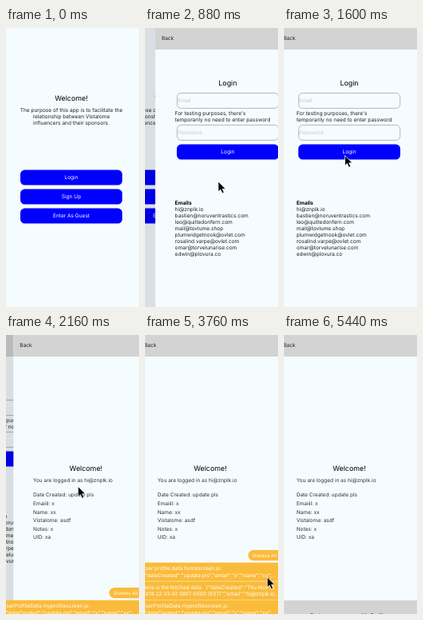
Write an HTML page that moves like this. It is 167x349 px and loops after 6400 ms.

```html
<!DOCTYPE html>
<html lang="en">
<head>
<meta charset="utf-8">
<title>App walkthrough</title>
<style>
  html, body { margin: 0; width: 100%; height: 100%; overflow: hidden; background: #f5fcff; }
  svg { display: block; width: 100%; height: 100%; }
  text { font: 6.55px Inter, "Open Sans", sans-serif; fill: #222; white-space: pre; text-rendering: geometricPrecision; }
  .mid { text-anchor: middle; }
  .title { font-size: 8.9px; fill: #000; }
  .soft { font-size: 6.5px; fill: #333; }
  .bold { font-weight: 700; fill: #000; }
  .hint { fill: #c7c7cd; }
  .white { fill: #fff; }
  .field { fill: none; stroke: #a3a7a9; stroke-width: .8; }
</style>
</head>
<body>
<svg id="stage" viewBox="0 0 167 349" preserveAspectRatio="none"></svg>
<script>
const LOOP = 6400, STEP = 80;
const EDGE = -9, WIDTH = 185;
const PAPER = '#f5fcff', GREY = '#d3d3d3', BLUE = '#0000ff', AMBER = '#fabb3a';
const stage = document.getElementById('stage');

function add(parent, tag, attrs = {}, content = '') {
  const el = document.createElementNS('http://www.w3.org/2000/svg', tag);
  for (const key in attrs) el.setAttribute(key, attrs[key]);
  el.textContent = content;
  return parent.appendChild(el);
}

const rect = (g, x, y, width, height, fill, rx = 0) =>
  add(g, 'rect', { x, y, width, height, fill, rx });
const label = (g, x, y, content, cls = '') =>
  add(g, 'text', { x, y, class: cls }, content);

function lines(g, x, y, gap, list, cls) {
  list.forEach((content, i) => label(g, x, y + i * gap, content, cls));
}

function button(g, y, content) {
  rect(g, 18, y, 128, 19, BLUE, 5.5);
  label(g, 82, y + 11.8, content, 'mid white');
}

function field(g, y, hint) {
  add(g, 'rect', { x: 18.4, y, width: 127.4, height: 19, rx: 5, class: 'field' });
  label(g, 19, y + 12, hint, 'hint');
}

function card(header) {
  const g = add(stage, 'g');
  rect(g, EDGE, 0, WIDTH, 349, PAPER);
  if (header) {
    rect(g, EDGE, 0, WIDTH, 27, GREY);
    label(g, -1, 14.6, 'Back');
  }
  return g;
}

// Each card carries a shade that darkens it while it is pushed back.
const shade = g => add(g, 'rect', { x: EDGE, y: 0, width: WIDTH, height: 349, opacity: 0 });

const home = card(false);
label(home, 82, 91.3, 'Welcome!', 'mid title');
lines(home, 82, 104.6, 8.1, [
  'The purpose of this app is to facilitate the',
  'relationship between Vistalome',
  'influencers and their sponsors.'
], 'mid');
['Login', 'Sign Up', 'Enter As Guest'].forEach((name, i) => button(home, 177.6 + i * 24, name));
const homeShade = shade(home);

const login = card(true);
label(login, 82, 71.5, 'Login', 'mid title');
field(login, 81.4, 'Email');
lines(login, 15.7, 109.2, 8, ["For testing purposes, there's", 'temporarily no need to enter password']);
field(login, 121.4, 'Password');
button(login, 145.6, 'Login');
label(login, 15.7, 220.6, 'Emails', 'bold');
lines(login, 15.7, 228.7, 8.05, [
  'hi@znplk.io',
  'bastien@noruventrastics.com',
  'leo@quiltedonfern.com',
  'mail@tovlume.shop',
  'plumwidgetnook@ovlet.com',
  'rosalind.varpe@ovlet.com',
  'omar@torvelunarise.com',
  'edwin@plovura.co'
]);
const loginShade = shade(login);

const profile = card(true);
label(profile, 82, 170.2, 'Welcome!', 'mid title');
label(profile, 15.7, 183.6, 'You are logged in as hi@znplk.io', 'soft');
lines(profile, 15.7, 202.4, 10.6, [
  'Date Created: update pls', 'Emaiiil: x', 'Name: xx',
  'Vistalome: asdf', 'Notes: x', 'UID: xa'
], 'soft');
rect(profile, EDGE, 332, WIDTH, 17, GREY);
label(profile, 33, 352.5, 'Partners');
label(profile, 97, 352.5, 'My Profile');

// Warnings stack upward from the bottom edge.
const record = '{"dateCreated":"update pls","email":"x","name":"xx",...';
const warnings = [
  ['userProfileData myprofilescreen.js:', record],
  ['Here is the fetched data:  {"dateCreated":"Thu Nov 15', '2018 22:33:42 GMT-0500 (EST)","email":"hi@znplk.io...'],
  ['user profile data homescreen.js:', record]
].map((pair, i) => {
  const g = add(stage, 'g');
  const y = 331.7 - i * 23.5;
  rect(g, EDGE, y, WIDTH, 23.5, AMBER);
  rect(g, EDGE, y + 23, WIDTH, .6, '#fde3ae');
  lines(g, -3.4, y + 9.4, 8.4, pair, 'white');
  return g;
});
const dismiss = add(stage, 'g');
rect(dismiss, 129.5, 0, 50, 13.4, AMBER, 6.7);
label(dismiss, 135, 8.9, 'Dismiss All', 'white').style.fontSize = '5.9px';

const cursor = add(stage, 'path', {
  d: 'M0 0V12.6L2.9 10 5 14.8 7.2 13.8 5.2 9.2H9.2Z',
  fill: '#000', stroke: '#fff', 'stroke-width': .7, 'stroke-linejoin': 'round'
});

// time, x, y of the pointer tip
const path = [
  [80, 112, 262], [480, 92, 192], [1280, 92, 192], [1600, 76.5, 159.5],
  [1840, 76.5, 159.5], [2160, 90.5, 189.5], [2560, 97, 225], [2640, 100.5, 239.5],
  [3040, 137, 272], [3200, 137, 272], [3760, 153.5, 303], [3920, 152, 328],
  [4000, 152, 325], [4640, 145, 273], [4800, 145, 273], [5360, 170, 310]
];
const pushes = { login: 697, profile: 1965 };
const warnAt = [2080, 2320, 2400], clearAt = 4880;

const clamp = v => Math.min(1, Math.max(0, v));
const curve = (a, b, s) => 3 * (1 - s) ** 2 * s * a + 3 * (1 - s) * s * s * b + s ** 3;

function push(t, start) {
  const x = clamp((t - start) / 500);
  if (x === 0 || x === 1) return x;
  let lo = 0, hi = 1;
  for (let i = 0; i < 24; i++) {
    const s = (lo + hi) / 2;
    if (curve(.2833, .31833, s) < x) lo = s; else hi = s;
  }
  return curve(.99, .99, lo);
}

const move = (el, x, y = 0) => el.setAttribute('transform', `translate(${x} ${y})`);
const show = (el, on) => el.setAttribute('visibility', on ? 'visible' : 'hidden');

function slide(front, back, backShade, p) {
  show(front, p > 0);
  move(front, (1 - p) * WIDTH);
  if (p > 0) move(back, -.3 * WIDTH * p);
  backShade.setAttribute('opacity', .13 * p);
}

function placeCursor(t) {
  const i = path.findIndex(k => k[0] > t);
  show(cursor, i > 0);
  if (i < 1) return;
  const [t0, x0, y0] = path[i - 1], [t1, x1, y1] = path[i];
  const f = (t - t0) / (t1 - t0);
  move(cursor, x0 + (x1 - x0) * f, y0 + (y1 - y0) * f);
}

function draw(t) {
  move(home, 0);
  slide(login, home, homeShade, push(t, pushes.login));
  slide(profile, login, loginShade, push(t, pushes.profile));

  const count = t < clearAt ? warnAt.filter(at => t >= at).length : 0;
  warnings.forEach((g, i) => show(g, i < count));
  show(dismiss, count > 0);
  move(dismiss, 0, 339.4 - count * 23.5);
  placeCursor(t);
}

const begin = performance.now();
function tick() {
  const t = (performance.now() - begin) % LOOP;
  draw(Math.floor(t / STEP) * STEP);
  requestAnimationFrame(tick);
}
tick();
</script>
</body>
</html>
```
